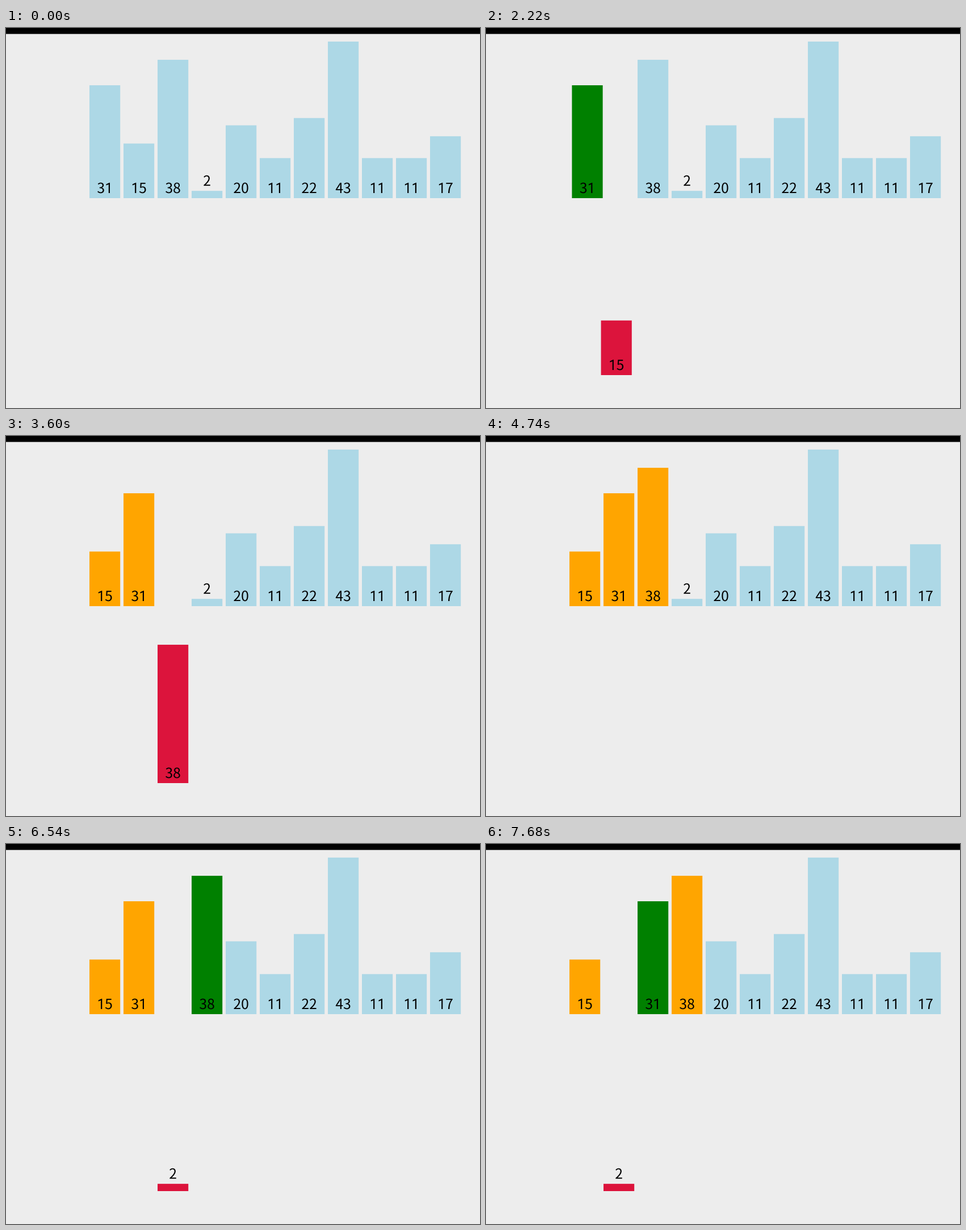
Write a matplotlib script that moves like this. It is 835 px wide and 670 px high and loops after 8 s.

```python
import matplotlib.pyplot as plt
from matplotlib.animation import FuncAnimation
from matplotlib.colors import to_rgb
from matplotlib.patches import PathPatch, Rectangle
from matplotlib.path import Path
from matplotlib.textpath import TextPath
from matplotlib.transforms import Affine2D
import numpy as np

W, H, DPI = 835, 670, 64
LOOP, INTERVAL, TICK = 8000, 20, 60
LEFT, BASE, DROP = 147, 300, 312
SLOT, BAR_W, UNIT = 60, 54.2, 6.42
FONT, SIZE, ADVANCE = "Noto Sans CJK JP", 24.7, 13.7
DURATION = 250

VALUES = [31, 15, 38, 2, 20, 11, 22, 43, 11, 11, 17]
IDLE, SORTED, KEY, COMPARE = map(to_rgb, ("lightblue", "orange", "crimson", "green"))

# Insertion sort: (start ms, {bar index: (slot, lowered, colour)})
STEPS = [
    (396, {0: (0, 0, SORTED)}),
    (982, {1: (1, 1, KEY)}),
    (1570, {0: (0, 0, COMPARE)}),
    (2154, {0: (1, 0, COMPARE), 1: (0, 1, KEY)}),
    (2740, {0: (1, 0, SORTED), 1: (0, 0, SORTED)}),
    (3328, {2: (2, 1, KEY)}),
    (3920, {0: (1, 0, COMPARE)}),
    (4482, {0: (1, 0, SORTED), 2: (2, 0, SORTED)}),
    (5084, {3: (3, 1, KEY)}),
    (5670, {2: (2, 0, COMPARE)}),
    (6264, {2: (3, 0, COMPARE), 3: (2, 1, KEY)}),
    (6860, {0: (1, 0, COMPARE), 2: (3, 0, SORTED)}),
    (7428, {0: (2, 0, COMPARE), 3: (1, 1, KEY)}),
]


def ease(p):
    """Cubic in-out."""
    p = min(max(p, 0), 1)
    return 4 * p ** 3 if p < 0.5 else 1 - 4 * (1 - p) ** 3


def digit(ch):
    if ch == "1":  # plain stem and flag, no foot
        return Path([(6.7, 0), (8.9, 0), (8.9, 18.2), (8, 18.2), (2.4, 15.6),
                     (2.4, 13.5), (6.7, 15.3), (6.7, 0)], closed=True)
    glyph = TextPath((0, 0), ch, size=SIZE, prop={"family": FONT})
    return Path(glyph.vertices, glyph.codes)


def label_path(text, baseline):
    x0 = BAR_W / 2 - ADVANCE * len(text) / 2
    parts = [digit(ch).transformed(
        Affine2D().scale(1, -1).translate(x0 + i * ADVANCE, baseline))
        for i, ch in enumerate(text)]
    return Path.make_compound_path(*parts)


fig = plt.figure(figsize=(W / DPI, H / DPI), dpi=DPI, facecolor="#ededed")
ax = fig.add_axes([0, 0, 1, 1])
ax.set(xlim=(0, W), ylim=(H, 0))
ax.axis("off")
ax.add_patch(Rectangle((0, 0), W, 10.5, color="black", lw=0, snap=False))


class Bar:
    def __init__(self, slot, value):
        self.home = (slot, 0, IDLE)
        height = value * UNIT
        self.shift = Affine2D()
        place = self.shift + ax.transData
        self.body = Rectangle((0, -height), BAR_W, height, lw=0, snap=False)
        baseline = -9 - (height if height < 25 else 0)
        text = PathPatch(label_path(str(value), baseline), fc="black", lw=0, snap=False)
        for z, patch in enumerate((self.body, text), 2):
            patch.set_zorder(z)
            patch.set_transform(place)
            ax.add_artist(patch)

    def show(self, slot, low, colour):
        self.shift.clear().translate(LEFT + SLOT * slot, BASE + DROP * low)
        self.body.set_facecolor(np.clip(colour, 0, 1))


bars = [Bar(i, v) for i, v in enumerate(VALUES)]


def blend(a, b, p):
    tint = 1 if p > 0.97 else p
    colour = np.array(a[2]) * (1 - tint) + np.array(b[2]) * tint
    return a[0] + (b[0] - a[0]) * p, a[1] + (b[1] - a[1]) * p, colour


def update(i):
    t = i * INTERVAL // TICK * TICK
    states = [bar.home for bar in bars]
    for start, changes in STEPS:
        if t < start:
            break
        p = ease((t - start) / DURATION)
        for k, goal in changes.items():
            states[k] = blend(states[k], goal, p)
    for bar, state in zip(bars, states):
        bar.show(*state)
    return [bar.body for bar in bars]


anim = FuncAnimation(fig, update, frames=LOOP // INTERVAL, interval=INTERVAL,
                     repeat=True, repeat_delay=0, cache_frame_data=False)
plt.show()
```
